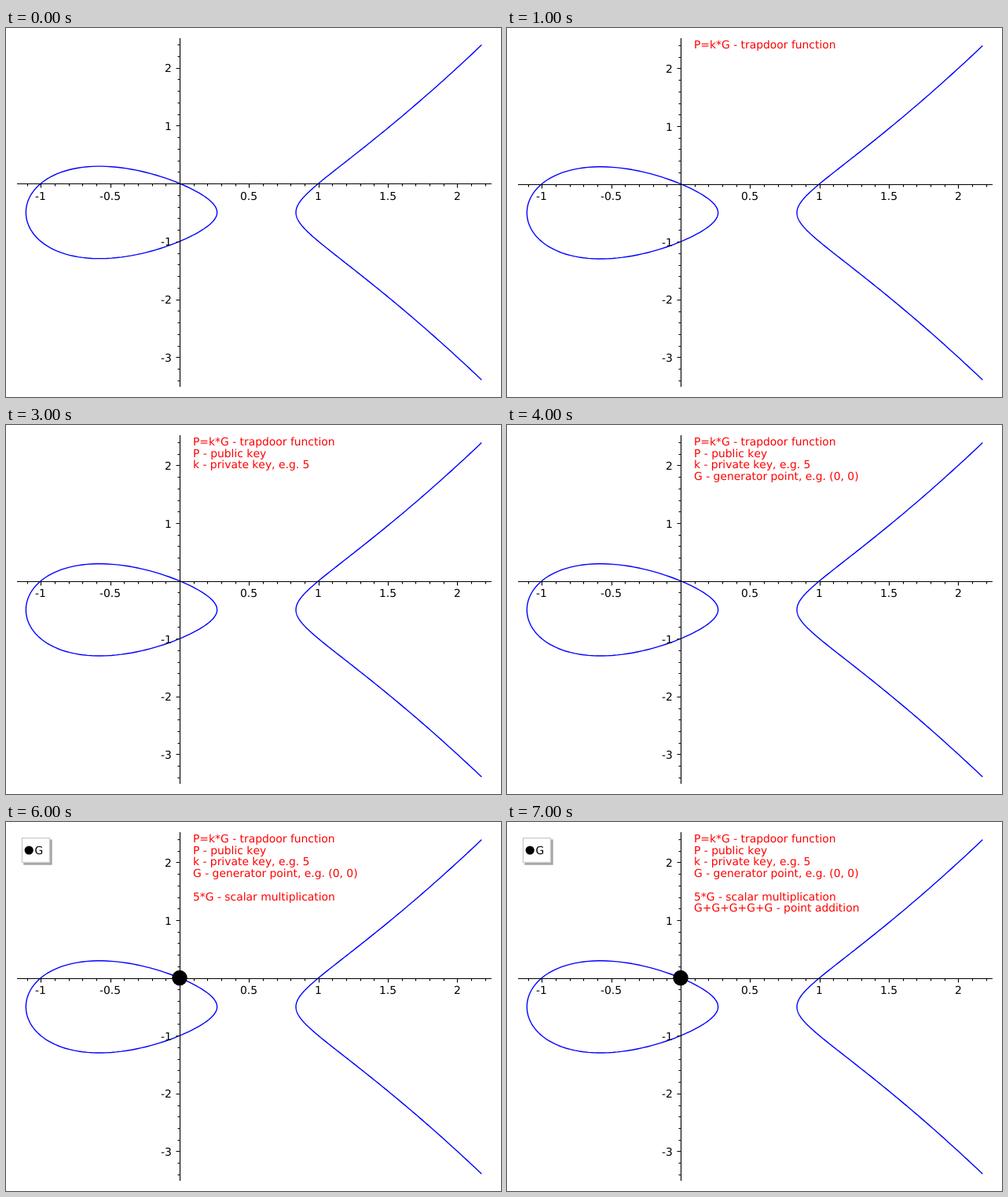
Recreate the animation shown at these times as an HTML page. Size 630x470 px, loop 8000 ms.

```html
<!DOCTYPE html>
<html lang="en">
<head>
<meta charset="utf-8">
<title>Elliptic curve trapdoor function</title>
<style>
  html, body { margin: 0; width: 100%; height: 100%; overflow: hidden; background: #fff; }
  svg { display: block; }
  text {
    font: 13.89px "DejaVu Sans", sans-serif;
    font-kerning: none;
    text-rendering: geometricPrecision;
  }
  .axes { stroke: #000; stroke-width: 1.11; fill: none; }
  .curve { stroke: #00f; stroke-width: 1.39; fill: none; stroke-linejoin: round; }
  .note { fill: #f00; }
</style>
</head>
<body>
<svg id="stage" width="630" height="470" viewBox="0 0 630 470"></svg>
<script>
const LOOP = 8000;
const X0 = 221, SX = 176.7;
const TOP = 13.44, HEIGHT = 442.95;
const MAJOR = 5, MINOR = 3;

// Text, baseline, time of appearance
const NOTES = [
  ["P=k*G - trapdoor function", 26, 1000],
  ["P - public key", 41, 2000],
  ["k - private key, e.g. 5", 55, 3000],
  ["G - generator point, e.g. (0, 0)", 70, 4000],
  ["5*G - scalar multiplication", 100, 6000],
  ["G+G+G+G+G - point addition", 114, 7000]
];

const stage = document.getElementById("stage");
const steps = [];

function add(parent, tag, attrs, text) {
  const el = document.createElementNS("http://www.w3.org/2000/svg", tag);
  for (const key in attrs) el.setAttribute(key, attrs[key]);
  if (text) el.textContent = text;
  return parent.appendChild(el);
}

function show(el, from, to = LOOP) {
  steps.push({ el, from, to });
  return el;
}

// Lines sit on pixel centres
const snap = v => Math.floor(v + 0.5) + 0.5;

// Labels start on a whole pixel; align is 0.5 for centred, 1 for right
function label(parent, value, x, y, align) {
  const el = add(parent, "text", { y }, String(value));
  el.setAttribute("x", Math.round(x - align * el.getComputedTextLength()));
}

// y² + y = x³ - x
const half = x => Math.sqrt(Math.max(0, x ** 3 - x + 0.25));
const root = k => 2 / Math.sqrt(3) *
  Math.cos((Math.acos(-3 * Math.sqrt(3) / 8) - 2 * Math.PI * k) / 3);

function curvePath(px, py) {
  const [right, inner, left] = [0, 1, 2].map(root).sort((a, b) => b - a);
  const point = (x, sign) => px(x).toFixed(2) + " " + py(-0.5 + sign * half(x)).toFixed(2);
  const oval = [], branch = [];
  const n = 120;
  for (let i = 0; i < n; i++) {
    const a = 2 * Math.PI * i / n;
    const x = (left + inner) / 2 - (inner - left) / 2 * Math.cos(a);
    oval.push(point(x, Math.sin(a) < 0 ? -1 : 1));
  }
  for (let i = -n; i <= n; i++) {
    const u = i / n;
    branch.push(point(right + (2.175 - right) * u * u, u < 0 ? 1 : -1));
  }
  return `M${oval.join("L")}ZM${branch.join("L")}`;
}

function plot(yMin, yMax) {
  const sy = HEIGHT / (yMax - yMin);
  const px = x => X0 + x * SX;
  const py = y => TOP + (yMax - y) * sy;
  const ax = snap(X0), ay = snap(py(0));
  const g = add(stage, "g", {});
  let d = `M14 ${ay}H618M${ax} 13V457`;

  add(g, "path", { class: "curve", d: curvePath(px, py) });
  for (let i = -11; i <= 22; i++) {
    if (!i) continue;
    const major = i % 5 === 0, x = px(i / 10);
    d += `M${snap(x)} ${ay}v${major ? MAJOR : MINOR}`;
    if (major) label(g, i / 10, x, 219, 0.5);
  }
  for (let i = -17; i <= 12; i++) {
    if (!i) continue;
    const major = i % 5 === 0, y = py(i / 5);
    d += `M${ax} ${snap(y)}h${major ? -MAJOR : -MINOR}`;
    if (major) label(g, i / 5, 211, Math.round(y + 5.6), 1);
  }
  add(g, "path", { class: "axes", d });
  return g;
}

function generatorPoint() {
  const g = add(stage, "g", {});
  const frame = { width: 35, height: 31, "stroke-width": 1.39 };
  add(g, "circle", { cx: X0, cy: 198.6, r: 9.8 });
  add(g, "rect", { ...frame, x: 23, y: 23, fill: "#4d4d4d", stroke: "#4d4d4d", opacity: 0.5 });
  add(g, "rect", { ...frame, x: 20.5, y: 20.5, fill: "#fff", stroke: "#ccc" });
  add(g, "circle", { cx: 29.2, cy: 36, r: 5.6 });
  add(g, "text", { x: 36.4, y: 41 }, "G");
  return g;
}

show(plot(-3.5025, 2.5025), 0, 1000);
show(plot(-3.5027, 2.5157), 1000);
show(generatorPoint(), 5000);
for (const [text, y, from] of NOTES) {
  show(add(stage, "text", { class: "note", x: 238, y }, text), from);
}

const start = performance.now();

function draw() {
  const t = (performance.now() - start) % LOOP;
  for (const { el, from, to } of steps) {
    el.style.visibility = t >= from && t < to ? "visible" : "hidden";
  }
  requestAnimationFrame(draw);
}
draw();
</script>
</body>
</html>
```
